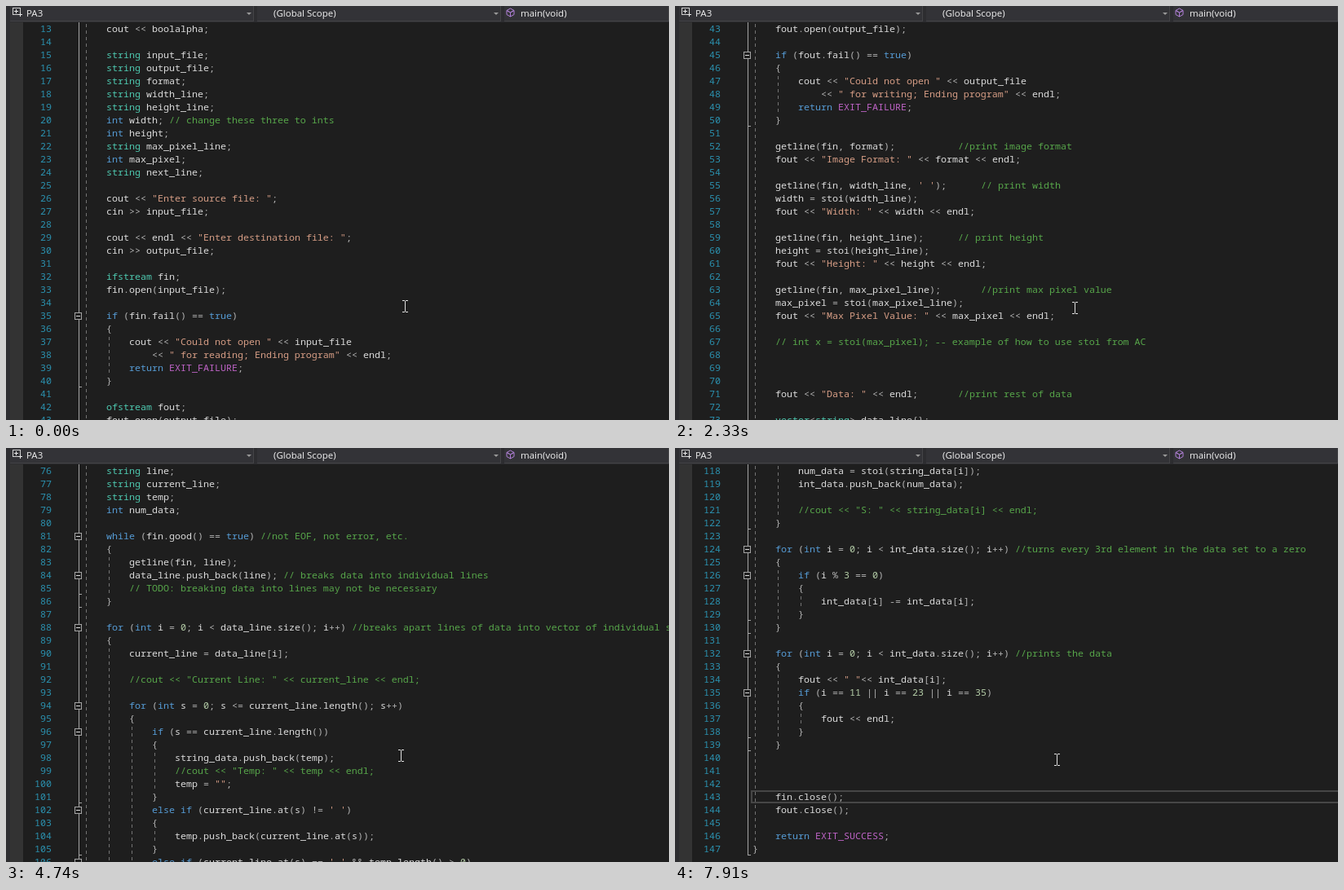
Recreate the animation shown at these times as an HTML page with a canvas. Size 813x508 px, loop 8000 ms.

```html
<!DOCTYPE html>
<html lang="en">
<head>
<meta charset="utf-8">
<title>Code scroll</title>
<style>
  html, body { margin: 0; width: 100%; height: 100%; overflow: hidden; background: #1e1e1e; }
  canvas { display: block; }
</style>
</head>
<body>
<canvas id="stage" width="813" height="508"></canvas>
<script>
const FIRST_LINE = 13, LAST_LINE = 147, ROW = 16, CELL = 7, TOP = 20, LOOP = 8000;

// Indentation follows from the braces; a leading ">" marks a continuation line.
const code = `cout << boolalpha;

string input_file;
string output_file;
string format;
string width_line;
string height_line;
int width; // change these three to ints
int height;
string max_pixel_line;
int max_pixel;
string next_line;

cout << "Enter source file: ";
cin >> input_file;

cout << endl << "Enter destination file: ";
cin >> output_file;

ifstream fin;
fin.open(input_file);

if (fin.fail() == true)
{
cout << "Could not open " << input_file
><< " for reading; Ending program" << endl;
return EXIT_FAILURE;
}

ofstream fout;
fout.open(output_file);

if (fout.fail() == true)
{
cout << "Could not open " << output_file
><< " for writing; Ending program" << endl;
return EXIT_FAILURE;
}

getline(fin, format);           //print image format
fout << "Image Format: " << format << endl;

getline(fin, width_line, ' ');      // print width
width = stoi(width_line);
fout << "Width: " << width << endl;

getline(fin, height_line);      // print height
height = stoi(height_line);
fout << "Height: " << height << endl;

getline(fin, max_pixel_line);       //print max pixel value
max_pixel = stoi(max_pixel_line);
fout << "Max Pixel Value: " << max_pixel << endl;

// int x = stoi(max_pixel); -- example of how to use stoi from AC



fout << "Data: " << endl;       //print rest of data

vector<string> data_line{};
vector<string> string_data{};
vector<int> int_data{};
string line;
string current_line;
string temp;
int num_data;

while (fin.good() == true) //not EOF, not error, etc.
{
getline(fin, line);
data_line.push_back(line); // breaks data into individual lines
// TODO: breaking data into lines may not be necessary
}

for (int i = 0; i < data_line.size(); i++) //breaks apart lines of data into vector of individual strings
{
current_line = data_line[i];

//cout << "Current Line: " << current_line << endl;

for (int s = 0; s <= current_line.length(); s++)
{
if (s == current_line.length())
{
string_data.push_back(temp);
//cout << "Temp: " << temp << endl;
temp = "";
}
else if (current_line.at(s) != ' ')
{
temp.push_back(current_line.at(s));
}
else if (current_line.at(s) == ' ' && temp.length() > 0)
{
string_data.push_back(temp);
//cout << "Temp: " << temp << endl;
temp = "";
}
}
}

for (int i = 0; i < string_data.size(); i++) //converts data vector of strings to data vector of ints
{
// TODO: check to make sure string_data[i] is an int
num_data = stoi(string_data[i]);
int_data.push_back(num_data);

//cout << "S: " << string_data[i] << endl;
}

for (int i = 0; i < int_data.size(); i++) //turns every 3rd element in the data set to a zero
{
if (i % 3 == 0)
{
int_data[i] -= int_data[i];
}
}

for (int i = 0; i < int_data.size(); i++) //prints the data
{
fout << " "<< int_data[i];
if (i == 11 || i == 23 || i == 35)
{
fout << endl;
}
}



fin.close();
fout.close();

return EXIT_SUCCESS;
}`;

const tokenRule = new RegExp([
  /(?<comment>\/\/.*)/, /(?<text>"[^"]*"|'[^']*')/,
  /(?<keyword>\b(?:int|if|else|for|while|return|true)\b)/,
  /(?<type>\b(?:string|vector|ifstream|ofstream)\b)/,
  /(?<macro>EXIT_\w+)/, /(?<number>\b\d+)/, /(?<name>\w+)/, /(?<sign>[^\w\s"']+)/
].map(part => part.source).join("|"), "g");

const colors = {
  comment: "#57a64a", text: "#d69d85", keyword: "#569cd6", type: "#4ec9b0",
  macro: "#bd63c5", number: "#b5cea8", name: "#dcdcdc", sign: "#b4b4b4"
};

let depth = 1;
const lines = code.split("\n").map(raw => {
  if (raw === "}") depth--;
  const more = raw[0] === ">";
  const body = more ? raw.slice(1) : raw;
  const tokens = [...body.matchAll(tokenRule)].map(m => ({
    text: m[0], col: m.index,
    color: colors[Object.keys(m.groups).find(kind => m.groups[kind])]
  }));
  const line = {
    tokens, indent: depth + (more ? 1 : 0), guides: raw === "{" || raw === "}" ? depth : depth,
    opens: /^(if|else|for|while)\b/.test(raw), closes: raw === "}"
  };
  if (raw === "{") depth++;
  return line;
});
lines[84 - FIRST_LINE].opens = lines[85 - FIRST_LINE].closes = true;

// Wheel notches of three lines; at the times in "resting" only the pointer moves.
const changes = [0, 140, 430, 580, 710, 1290, 1450, 1590, 1740, 2210, 2330, 2480, 2760, 2880,
  3320, 3460, 3590, 3890, 4030, 4160, 4590, 4740, 4870, 4990, 5120, 5260, 5390, 5510, 5790,
  5930, 6050, 6180, 6300, 6440, 6560, 6990, 7120, 7270, 7410, 7530, 7650, 7770, 7910];
const resting = new Set([0, 4990, 5120, 5510, 6560, 7120, 7770, 7910]);
const pointerPath = [[0, 489, 368], [1590, 490, 369], [3320, 489, 371], [4740, 484, 377],
  [5930, 473, 385], [6560, 465, 386], [7770, 469, 382], [7910, 468, 382]];

let topLine = FIRST_LINE;
const steps = changes.map(time => {
  if (!resting.has(time)) topLine += 3;
  return { time, topLine, pointer: pointerAt(time) };
});

function pointerAt(time) {
  const next = Math.max(1, pointerPath.findIndex(p => p[0] >= time));
  const [t0, x0, y0] = pointerPath[next - 1], [t1, x1, y1] = pointerPath[next];
  const k = (time - t0) / (t1 - t0);
  return [Math.round(x0 + (x1 - x0) * k), Math.round(y0 + (y1 - y0) * k)];
}

const ctx = document.getElementById("stage").getContext("2d");

function box(x, y, w, h, color) {
  ctx.fillStyle = color;
  ctx.fillRect(x, y, w, h);
}

function frame(x, y, w, h, color, weight = 1) {
  ctx.strokeStyle = color;
  ctx.lineWidth = weight;
  ctx.strokeRect(x + weight / 2, y + weight / 2, w - weight, h - weight);
}

function label(text, x, y, color) {
  ctx.fillStyle = color;
  ctx.fillText(text, x, y);
}

function shape(points, color, filled) {
  ctx.beginPath();
  points.forEach(([x, y]) => ctx.lineTo(x, y));
  ctx.closePath();
  ctx.lineWidth = 1;
  ctx.fillStyle = ctx.strokeStyle = color;
  filled ? ctx.fill() : ctx.stroke();
}

function drawHeader() {
  box(0, 0, 813, TOP, "#2d2d30");
  for (const [x, w] of [[5, 299], [308, 299], [611, 202]]) {
    box(x, 0, w, 18, "#333337");
    box(x, 18, w, 1, "#434346");
    box(x + w - 1, 0, 1, 19, "#434346");
  }
  for (const x of [298, 601]) shape([[x - 3, 8], [x + 3, 8], [x, 11]], "#999999", true);
  ctx.font = '11.5px "Open Sans", "Noto Sans", sans-serif';
  label("PA3", 25, 13, "#f1f1f1");
  label("(Global Scope)", 328, 13, "#f1f1f1");
  label("main(void)", 631, 13, "#f1f1f1");

  frame(8, 2, 10, 9, "#d0d0d0");
  for (const [x, y] of [[12, 6], [17, 10]]) {
    box(x - 2, y, 5, 1, "#e8e8e8");
    box(x, y - 2, 1, 5, "#e8e8e8");
  }
  const purple = "#b180d7";
  shape([[618.5, 3], [623, 5.5], [623, 10.5], [618.5, 13], [614, 10.5], [614, 5.5]], purple);
  shape([[614, 5.5], [618.5, 8], [623, 5.5], [618.5, 8], [618.5, 13], [618.5, 8]], purple);
}

function drawOutline(line, y, last) {
  box(89, y, 1, last ? ROW : ROW, "#a5a5a5");
  if (line.closes) box(89, y + 15, 4, 1, "#a5a5a5");
  if (line.opens) {
    box(84, y + 4, 9, 9, "#1e1e1e");
    frame(84, y + 4, 9, 9, "#a5a5a5");
    box(86, y + 8, 5, 1, "#dcdcdc");
  }
}

function drawLine(number, y) {
  const line = lines[number - FIRST_LINE];
  if (number === 143) frame(93, y, 724, ROW, "#464646", 2);
  label(number, 56 - CELL * String(number).length, y + 12, "#2b91af");
  drawOutline(line, y);
  for (let d = 0; d < line.guides; d++)
    for (let dash = 2; dash < ROW; dash += 8) box(98 + 28 * d, y + dash, 1, 4, "#747474");
  for (const { text, col, color } of line.tokens)
    label(text, 95 + 28 * line.indent + CELL * col, y + 12, color);
}

function drawPointer([x, y]) {
  const color = "#e0e0e0";
  box(x, y - 6, 1, 13, color);
  for (const edge of [y - 7, y + 7]) {
    box(x - 3, edge, 3, 1, color);
    box(x + 1, edge, 3, 1, color);
  }
}

function draw(step) {
  box(0, 0, 813, 508, "#1e1e1e");
  box(0, TOP, 5, 488, "#2d2d30");
  box(5, TOP, 16, 488, "#333333");
  ctx.font = '11.667px "Noto Sans Mono", "DejaVu Sans Mono", monospace';
  for (let row = 0; row <= 30 && step.topLine + row <= LAST_LINE; row++)
    drawLine(step.topLine + row, TOP + row * ROW);
  drawPointer(step.pointer);
  drawHeader();
}

const start = performance.now();
let shown;
function tick() {
  const time = (performance.now() - start) % LOOP;
  const step = steps.findLast(s => s.time <= time);
  if (step !== shown) draw(shown = step);
  requestAnimationFrame(tick);
}
tick();
</script>
</body>
</html>
```
